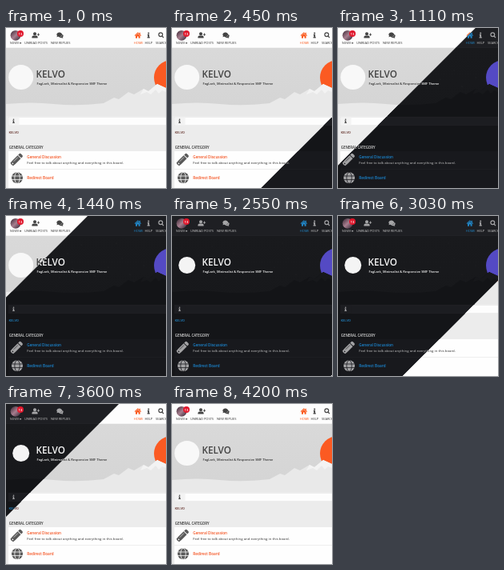
Recreate the animation shown at these times as an HTML page with a canvas. Size 200 by 200 pixels, loop 4.5 s.

```html
<!DOCTYPE html>
<html lang="en">
<head>
<meta charset="utf-8">
<title>Forum theme switch</title>
<style>
html, body { margin: 0; width: 100%; height: 100%; overflow: hidden; background: #ececec; }
canvas { display: block; width: 200px; height: 200px; }
</style>
</head>
<body>
<canvas id="stage"></canvas>
<script>
const SIZE = 200, LOOP = 4500, STEP = 30;
const canvas = document.getElementById('stage');
const ctx = canvas.getContext('2d');
const FONT = '"Open Sans", "Noto Sans", sans-serif';

const light = {
  head: '#fdfdfd', headLine: '#e8e8e8', nav: '#333333', icon: '#444444', accent: '#fa5a1e',
  heroTop: '#d9d9d9', heroLow: '#d4d4d4', hill: '#e9e9e9', snow: '#f3f3f3',
  sun: '#fb5a22', mark: '#f8f8f8', markSize: 15.5, title: '#444444', sub: '#333333',
  page: '#ececec', bar: '#fdfdfd', cell: '#f3f3f3', line: '#dddddd', crumb: '#5f2b24',
  cat: '#333333', row: '#fefefe', text: '#333333', link: '#f4511e', glyph: '#5a5a5a'
};
const dark = {
  head: '#1e1f23', headLine: '#242529', nav: '#c9c9c9', icon: '#a5a5a7', accent: '#2185c5',
  heroTop: '#191a1d', heroLow: '#17181b', hill: '#131417', snow: '#17181b',
  sun: '#544ac4', mark: '#f4f4f4', markSize: 10.5, title: '#f4f4f4', sub: '#f4f4f4',
  page: '#141518', bar: '#1c1d21', cell: '#1c1d21', line: '#222327', crumb: '#2185c5',
  cat: '#d8d8d8', row: '#18191d', text: '#c4c4c4', link: '#1b87d2', glyph: '#a2a2a4', stars: '#303136'
};

function box(x, y, w, h, color) {
  ctx.fillStyle = color;
  ctx.fillRect(x, y, w, h);
}
function disc(x, y, r, color) {
  ctx.fillStyle = color;
  ctx.beginPath();
  ctx.arc(x, y, r, 0, Math.PI * 2);
  ctx.fill();
}
function shape(path, color) {
  ctx.fillStyle = color;
  ctx.fill(new Path2D(path));
}
function stroke(path, color, width) {
  ctx.strokeStyle = color;
  ctx.lineWidth = width;
  ctx.stroke(new Path2D(path));
}
function label(str, x, y, size, color, weight = 400, align = 'left') {
  ctx.font = `${weight} ${size}px ${FONT}`;
  ctx.textAlign = align;
  ctx.fillStyle = color;
  ctx.fillText(str, x, y);
}

function infoIcon(x, y, color, size = 1) {
  ctx.save();
  ctx.translate(x, y);
  ctx.scale(size, size);
  disc(0, -2.7, 1.1, color);
  shape('M-1.5-1H.9V2.4H1.7V3.6H-1.7V2.4H-.9V.2H-1.5z', color);
  ctx.restore();
}

function avatar() {
  ctx.save();
  ctx.beginPath();
  ctx.arc(12, 9.3, 6.4, 0, Math.PI * 2);
  ctx.clip();
  const g = ctx.createLinearGradient(6, 3, 18, 16);
  g.addColorStop(0, '#3a2834');
  g.addColorStop(0.5, '#a87f90');
  g.addColorStop(1, '#2c2230');
  box(5, 2, 14, 15, g);
  ctx.restore();
  disc(18, 7, 4, '#e0162b');
  label('13', 18, 8.5, 4.2, '#ffffff', 600, 'center');
}

function header(c) {
  box(0, 0, SIZE, 25, c.head);
  box(0, 24.5, SIZE, 0.5, c.headLine);
  avatar();
  label('NUVEK', 5, 20.3, 3.5, c.nav);
  shape('M16.8 18.2h2.6l-1.3 1.7z', c.nav);

  disc(36, 7.2, 2, c.icon);
  shape('M32.4 12.5v-1q0-2 2-2h3.2q2 0 2 2v1z', c.icon);
  stroke('M38.9 8.2h3.2M40.5 6.6v3.2', c.icon, 0.9);
  label('UNREAD POSTS', 23, 19.6, 3.97, c.nav, 500);

  shape('M63.3 8.3a3.4 2.7 0 1 1 2 2.4l-2.1.6.8-1.2z', c.icon);
  shape('M70.4 7.8a3 2.5 0 0 1 .4 3.8l.6 1.2-2.1-.6a4 3 0 0 1-3.3-1q4.4.2 4.4-3.4z', c.icon);
  label('NEW REPLIES', 56, 19.6, 3.97, c.nav, 500);

  shape('M160.6 9.2l4.2-3.9 1.8 1.6v-1.2h1.2v2.4l1.3 1.1-.6.7-3.7-3.3-3.6 3.3z', c.accent);
  shape('M162 9.5l2.8-2.5 2.8 2.5v3.2h-2v-2.2h-1.6v2.2h-2z', c.accent);
  label('HOME', 159.7, 19.6, 3.97, c.accent, 500);
  infoIcon(178.2, 9, c.icon, 0.95);
  label('HELP', 173.5, 19.6, 3.97, c.nav, 500);
  ctx.strokeStyle = c.icon;
  ctx.lineWidth = 1.2;
  ctx.beginPath();
  ctx.arc(193.3, 8.2, 2.4, 0, Math.PI * 2);
  ctx.moveTo(195, 10);
  ctx.lineTo(197, 12.2);
  ctx.stroke();
  label('SEARCH', 187, 19.6, 3.97, c.nav, 500);
}

function hero(c) {
  ctx.save();
  ctx.beginPath();
  ctx.rect(0, 25, SIZE, 85);
  ctx.clip();
  const g = ctx.createLinearGradient(0, 25, 0, 110);
  g.addColorStop(0, c.heroTop);
  g.addColorStop(1, c.heroLow);
  box(0, 25, SIZE, 85, g);
  if (c.stars) {
    for (let i = 0; i < 16; i++) disc((i * 61 + 23) % 200, 29 + (i * 37) % 50, 0.4, c.stars);
  }
  disc(207, 62, 22, c.sun);
  shape('M0 95Q32 92 60 95T122 94L135 87L141 89L153 80L160 83L172 76L178 79L189 70L200 75V110H0z', c.hill);
  shape('M172 76L178 79L189 70L200 75V80L195 78L191 82L187 77L181 83L176 80L168 83z', c.snow);
  ctx.restore();
  disc(18.7, 61.5, c.markSize, c.mark);
  label('KELVO', 37.5, 62.2, 11.7, c.title, 600);
  label('FogLark, Minimalist & Responsive SMF Theme', 38.5, 70.7, 4, c.sub, 600);
}

function pencil(c) {
  ctx.save();
  ctx.translate(13.5, 164.3);
  ctx.rotate(-Math.PI / 4);
  shape('M-9.3 0L-8.8-2.6L-4.6-2.8H4.3V2.8H-4.6L-8.8 2.6z', c.glyph);
  shape('M5.2-2.8H7q1.6 0 1.6 1.6V1.2q0 1.6-1.6 1.6H5.2z', c.glyph);
  stroke('M-4.5-1H3', c.row, 0.6);
  disc(-7.2, 0, 0.8, c.row);
  ctx.restore();
}

function globe(c) {
  disc(14, 187.3, 7, c.glyph);
  ctx.strokeStyle = c.row;
  ctx.lineWidth = 0.8;
  ctx.beginPath();
  ctx.ellipse(14, 187.3, 3.2, 7, 0, 0, Math.PI * 2);
  ctx.moveTo(7, 185);
  ctx.lineTo(21, 185);
  ctx.moveTo(7, 189.6);
  ctx.lineTo(21, 189.6);
  ctx.stroke();
}

function board(c) {
  box(0, 110, SIZE, 90, c.page);
  box(3, 111, 197, 11, c.line);
  box(3.5, 111.5, 197, 10, c.bar);
  box(3.5, 111.5, 13, 10, c.cell);
  infoIcon(9.5, 116.3, c.icon, 0.75);
  label('KELVO', 3.5, 132.3, 4, c.crumb, 600);
  label('GENERAL CATEGORY', 3.8, 150.5, 4.36, c.cat, 600);
  box(3, 154, SIZE, 46, c.row);
  box(3, 176, SIZE, 0.5, c.line);
  pencil(c);
  label('General Discussion', 26.3, 162.7, 4.67, c.link, 600);
  label('Feel free to talk about anything and everything in this board.', 26.3, 169.6, 4.3, c.text);
  globe(c);
  label('Redirect Board', 26.3, 188.7, 4.67, c.link, 600);
}

function page(c) {
  hero(c);
  header(c);
  board(c);
}

// Paints a theme on the lower right side of the line x + y = edge.
function wipe(c, edge) {
  ctx.save();
  ctx.beginPath();
  ctx.moveTo(edge, 0);
  ctx.lineTo(500, 0);
  ctx.lineTo(500, 500);
  ctx.lineTo(0, 500);
  ctx.lineTo(0, edge);
  ctx.clip();
  page(c);
  ctx.restore();
}

function draw(time) {
  // The small lead keeps clock jitter from holding back a step.
  const t = Math.floor(((time + 2) % LOOP) / STEP) * STEP;
  const toDark = 400.4 - 400 * (t - 30) / 1890;
  const toLight = 406 - 7.36 * (t - 2520) / STEP;
  if (t < 60 || t >= 4200) page(light);
  else if (t < 1920) { page(light); wipe(dark, toDark); }
  else if (t < 2550) page(dark);
  else { page(dark); wipe(light, toLight); }
}

const scale = window.devicePixelRatio || 1;
canvas.width = canvas.height = Math.round(SIZE * scale);
ctx.scale(scale, scale);

function tick() {
  draw(performance.now());
  requestAnimationFrame(tick);
}
tick();
</script>
</body>
</html>
```
